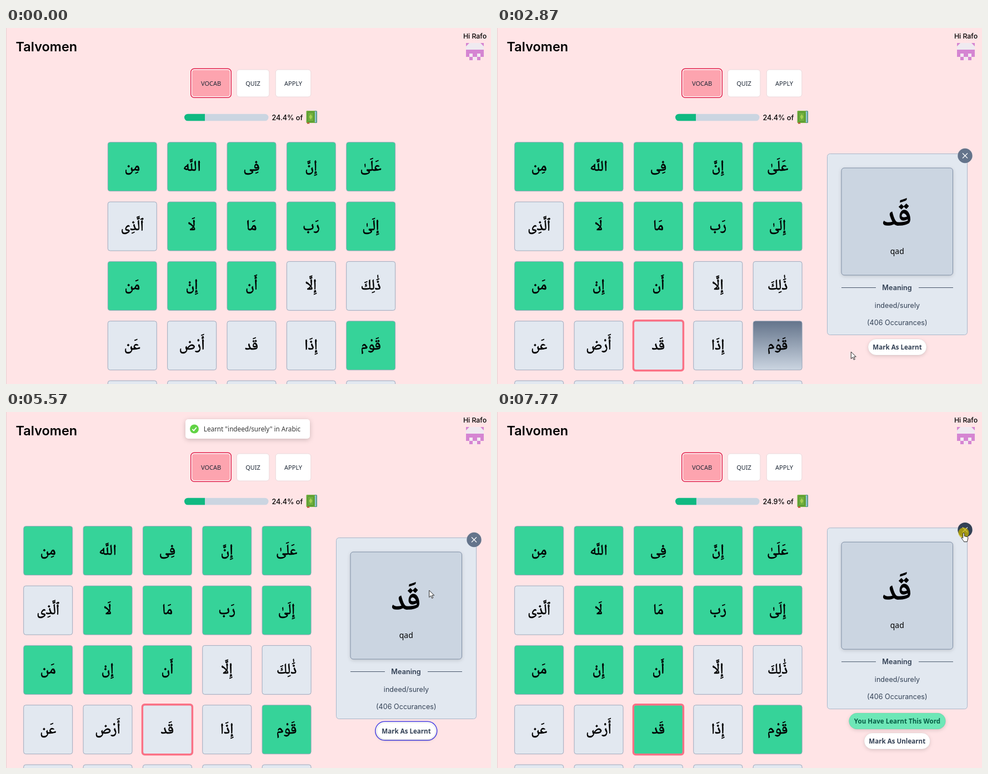
Recreate the animation shown at these times as an HTML page. Size 873 px wide and 641 px high, loop 8 s.

```html
<!DOCTYPE html>
<html lang="en">
<head>
<meta charset="utf-8">
<title>Vocabulary cards</title>
<style>
html, body { margin: 0; width: 100%; height: 100%; overflow: hidden; background: #ffe4e6; }
svg { display: block; }
text { text-anchor: middle; white-space: pre; }
.ui { font-family: "Noto Sans", "Open Sans", sans-serif; }
.app { font-family: Inter, Roboto, sans-serif; font-weight: 500; }
.light { font-weight: 400; }
.semi { font-weight: 600; }
.left { text-anchor: start; }
.ar { font-family: "Noto Naskh Arabic", "Noto Sans Arabic", "DejaVu Sans", sans-serif; direction: rtl; stroke: #000; stroke-width: .028em; }
.drop { filter: drop-shadow(0 2px 3px #0002); }
</style>
</head>
<body>
<svg id="stage" width="873" height="641" viewBox="0 0 873 641"></svg>
<script>
const LOOP = 8000, SHIFT = 2200, LEARNT = 6810, TOAST = 4992, PITCH = 107.35;
const words = ("مِن اللَّه فِى إِنَّ عَلَىٰ ٱلَّذِى لَا مَا رَب إِلَىٰ مَن إِنْ أَن إِلَّا ذَٰلِكَ " +
  "عَن أَرْض قَد إِذَا قَوْم").split(" ");
const unknown = [5, 13, 14, 15, 16, 17, 18], PICK = 17;

const rect = (x, y, w, h, r, fill, more = "") =>
  `<rect x="${x}" y="${y}" width="${w}" height="${h}" rx="${r}" fill="${fill}" ${more}/>`;
const text = (x, y, size, cls, str, more = "") =>
  `<text x="${x}" y="${y}" font-size="${size}" class="${cls}" ${more}>${str}</text>`;
const group = (id, body, more = "") => `<g id="${id}" ${more}>${body}</g>`;

const cells = Array.from({ length: 25 }, (_, i) => {
  const x = i % 5 * PITCH, y = 205.7 + Math.floor(i / 5) * PITCH;
  return rect(x, y, 88, 88, 4, "", `id="c${i}" stroke="#94a3b8" stroke-width=".9"`) +
    text(x + 44, y + 51, 26.6, "ar", words[i] || "");
}).join("");

const tab = (x, w, label) =>
  rect(x, 75, w, 49, 5, "#fff", 'stroke="#ead9dc"') + text(x + w / 2, 104.2, 11, "ui", label, 'fill="#1f2937" font-weight="500"');

const avatar = `<path d="M828 39v-6l6-6h20l6 6v6z" fill="#efeaf0"/>
  <path d="M828 33v-6h6zM860 33v-6h-6zM828 39h32v13h-6v6h-6v-6h-8v6h-6v-6h-6z" fill="#d585d2"/>
  <path d="M834 46h6v6h-6zM848 46h6v6h-6zM841 52h6v6h-6z" fill="#f3e9f1"/>`;

const book = rect(541, 149, 19, 22, 1.5, "#4d8f7a") + rect(556, 150, 2.5, 20, 0, "#8fc3d8") +
  rect(540.5, 149, 15.5, 22, 1.5, "#6fae3d") +
  rect(543, 151.5, 11, 17, 1, "none", 'stroke="#4c8a2c"') +
  '<path d="M548.5 155l3 5-3 5-3-5z" fill="#a5cf52"/><path d="M542 170h4v3l-2-1-2 1z" fill="#b8572f"/>';

const panel = rect(594.5, 226.5, 252, 326, 5, "#e2e8f0", 'stroke="#a9b7ca"') +
  rect(620, 252, 200.5, 193, 5, "#cbd5e1", 'stroke="#7f8ea5" class="drop"') +
  text(720, 355, 59, "ar", words[PICK]) +
  text(720.3, 407, 14, "ui", "qad") +
  '<path d="M620 467.5h62M759 467.5h62" stroke="#475569"/>' +
  text(720, 472, 12.7, "app semi", "Meaning", 'fill="#334155"') +
  text(720.5, 503.5, 12.6, "app light", "indeed/surely", 'fill="#334155"') +
  text(720.3, 535, 12.6, "app light", "(406 Occurances)", 'fill="#334155"') +
  '<circle id="close" cx="842.5" cy="230" r="13.2"/><path d="M838 225.5l9 9m0-9l-9 9" stroke="#fff" stroke-width="1.2"/>';

const pill = (x, y, w, fill, label, color = "#334155") =>
  rect(x, y, w, 29, 14.5, fill, 'stroke="#0001" class="drop"') +
  text(x + w / 2, y + 19.2, 11.6, "ui semi", label, `fill="${color}"`);

const toast = rect(-112, -17.5, 224, 35, 5, "#fff", 'style="filter:drop-shadow(0 2px 4px #0003)"') +
  group("icon", '<circle r="8" fill="#61d345"/><path id="tick" d="M-3.6 .3l2.6 2.8 4.8-5.8" fill="none" stroke="#fff" stroke-width="1.8" stroke-dasharray="12"/>') +
  text(8, 4.6, 11.7, "ui", 'Learnt "indeed/surely" in Arabic', 'fill="#363636"');

const cursors = group("arrow", '<path d="M0 0v12.5l3-2.8 2 4.6 2-.9-2-4.4h4z"/>') +
  group("hand", '<path d="M-1.3 1q1.3-1.6 2.6 0v5l5 1.2q1.8.5 1.6 2.3l-1 4.2-.8 2.5h-5.5l-1.2-2.2-3.6-4.5q.2-1.6 1.8-.8l1.1 1z"/>') +
  group("beam", '<path d="M-3-6h2.2L0-5l.8-1H3M0-5V5M-3 6h2.2L0 5l.8 1H3" fill="none"/>');

document.getElementById("stage").innerHTML =
  '<defs><linearGradient id="hover" x2="0" y2="1"><stop stop-color="#64748b"/><stop offset="1" stop-color="#cbd5e1"/></linearGradient></defs>' +
  rect(0, 0, 873, 641, 0, "#ffe4e6") + rect(0, 0, 1, 641, 0, "#e6cfd2") +
  text(17.5, 42, 23.5, "app semi left", "Talvomen") +
  text(844, 19, 12.3, "app", "Hi Rafo") + avatar +
  rect(332.8, 73.3, 72.4, 52, 6, "#fff", 'stroke="#e11d48" stroke-width="1.5"') +
  rect(335, 75.5, 68, 47.6, 4, "#fda4af") + text(369, 104.2, 11, "ui", "VOCAB", 'fill="#1f2937" font-weight="500"') +
  tab(415.3, 58.5, "QUIZ") + tab(485.3, 63.5, "APPLY") +
  rect(321, 154.7, 151.5, 12.6, 6.3, "#cbd5e1") + '<path id="bar" fill="#10b981"/>' +
  text(478.5, 165.5, 12.6, "app left", "", 'id="share"') + book +
  group("grid", cells + rect(2 * PITCH - 1, 205.7 + 3 * PITCH - 1, 90, 90, 4, "none", 'id="ring" stroke="#fb7185" stroke-width="3.4"')) +
  group("panel", panel) +
  group("todo", rect(664.8, 557.3, 111, 34, 17, "#fff", 'id="focus" stroke="#4f46e5" stroke-width="1.5"') + pill(668, 560, 105, "#fff", "Mark As Learnt")) +
  group("done", pill(633.5, 542, 174, "#6ee7b7", "You Have Learnt This Word", "#065f46") + pill(661, 578, 118.5, "#fff", "Mark As Unlearnt")) +
  group("toast", toast) +
  group("cursor", '<circle id="click" r="9.6" fill="#c8b400" fill-opacity=".75" stroke="none"/>' + cursors, 'fill="#fff" stroke="#111" stroke-width=".9" stroke-linejoin="round"');

const $ = Object.fromEntries([...document.querySelectorAll("[id]")].map(e => [e.id, e]));
const set = (id, name, value) => $[id].setAttribute(name, value);
const show = (id, on) => set(id, "visibility", on ? "inherit" : "hidden");
const phase = (t, start, length) => Math.min(1, Math.max(0, (t - start) / length));

function bezier(x1, y1, x2, y2) {
  const at = (a, b, u) => 3 * a * u * (1 - u) ** 2 + 3 * b * u * u * (1 - u) + u ** 3;
  return x => {
    let lo = 0, hi = 1;
    for (let i = 0; i < 20; i++) {
      const mid = (lo + hi) / 2;
      if (at(x1, x2, mid) < x) lo = mid; else hi = mid;
    }
    return x <= 0 ? 0 : x >= 1 ? 1 : at(y1, y2, lo);
  };
}
const enter = bezier(.21, 1.02, .73, 1), leave = bezier(.06, .71, .55, 1), smooth = bezier(.4, 0, .2, 1);

// time, x, y
const path = [
  [620, 643, 626], [760, 575, 612], [900, 500, 606], [980, 461, 613], [1090, 421.5, 594.5],
  [2500, 421.5, 594.5], [2700, 470, 592], [2820, 546, 588], [2870, 637, 583], [2980, 671, 587],
  [3080, 671, 587], [3280, 701.5, 584.5], [4570, 701.5, 584.5], [4900, 716, 430], [5120, 724, 357],
  [5420, 724, 357], [5820, 824, 262], [6050, 824, 262], [6400, 840, 235], [6860, 840, 235], [7200, 840, 217.5]
];
function pointer(t) {
  const i = path.findIndex(p => p[0] > t);
  if (i < 0) return path[path.length - 1].slice(1);
  if (i === 0) return [-50, -50];
  const [a, b] = [path[i - 1], path[i]], k = (t - a[0]) / (b[0] - a[0]);
  return [a[1] + (b[1] - a[1]) * k, a[2] + (b[2] - a[2]) * k];
}
function cellAt([x, y], gridX) {
  const col = Math.floor((x - gridX) / PITCH), row = Math.floor((y - 205.7) / PITCH);
  const inside = (x - gridX) % PITCH < 88 && (y - 205.7) % PITCH < 88;
  return inside && col >= 0 && col < 5 && row >= 0 ? row * 5 + col : -1;
}

function draw(t) {
  const open = t >= SHIFT, learnt = t >= LEARNT, gridX = open ? 31.7 : 183.3;
  const pos = pointer(t), [x, y] = pos;

  // the card highlight trails the pointer slightly
  const hovered = cellAt(pointer(t > 1090 ? t - 60 : t), gridX);
  set("grid", "transform", `translate(${gridX})`);
  for (let i = 0; i < 25; i++) {
    const known = i < 20 && !unknown.includes(i) || learnt && i === PICK;
    set("c" + i, "fill", i === hovered ? "url(#hover)" : known ? "#36d399" : "#e2e8f0");
  }
  show("ring", open);

  $.share.textContent = learnt ? "24.9% of" : "24.4% of";
  set("bar", "d", `M327.3 154.7H${learnt ? 358.8 : 358}v12.6H327.3a6.3 6.3 0 0 1 0-12.6z`);

  set("panel", "opacity", smooth(phase(t, 2130, 720)));
  set("panel", "transform", `translate(0 ${learnt ? -17.8 : 0})`);
  const dark = phase(t, 6420, 150), mix = (a, b) => a + (b - a) * dark;
  set("close", "fill", `rgb(${mix(100, 51)},${mix(116, 65)},${mix(139, 85)})`);
  show("todo", open && !learnt);
  show("focus", t >= 3730 && !learnt);
  show("done", learnt);

  const p = enter(phase(t, TOAST, 350)), q = leave(phase(t, TOAST + 2000, 400));
  show("toast", t >= TOAST && q < 1);
  set("toast", "opacity", (.5 + .5 * p) * (1 - q));
  set("toast", "transform", `translate(435 ${30.5 - 70 * (1 - p) - 52.5 * q}) scale(${.6 + .4 * p - .4 * q})`);
  const pop = enter(phase(t, TOAST + 70, 260));
  set("icon", "transform", `translate(-96) scale(${pop})`);
  set("icon", "opacity", pop);
  set("tick", "stroke-dashoffset", 12 * (1 - phase(t, TOAST + 330, 200)));

  const onButton = open && (x > 668 && x < 773 && y > 560 && y < 589 || Math.hypot(x - 842.5, y - (learnt ? 212 : 230)) < 14);
  const kind = onButton || cellAt(pos, gridX) >= 0 ? "hand" : open && x > 690 && x < 750 && y > 300 && y < 550 ? "beam" : "arrow";
  for (const id of ["arrow", "hand", "beam"]) show(id, id === kind);
  show("cursor", t >= 620);
  set("cursor", "transform", `translate(${x} ${y})`);
  show("click", t >= 1560 && t < 1750 || t >= 3680 && t < 3930 || t >= 7770);
}

const start = performance.now();
(function tick() {
  draw((performance.now() - start) % LOOP);
  requestAnimationFrame(tick);
})();
</script>
</body>
</html>
```
